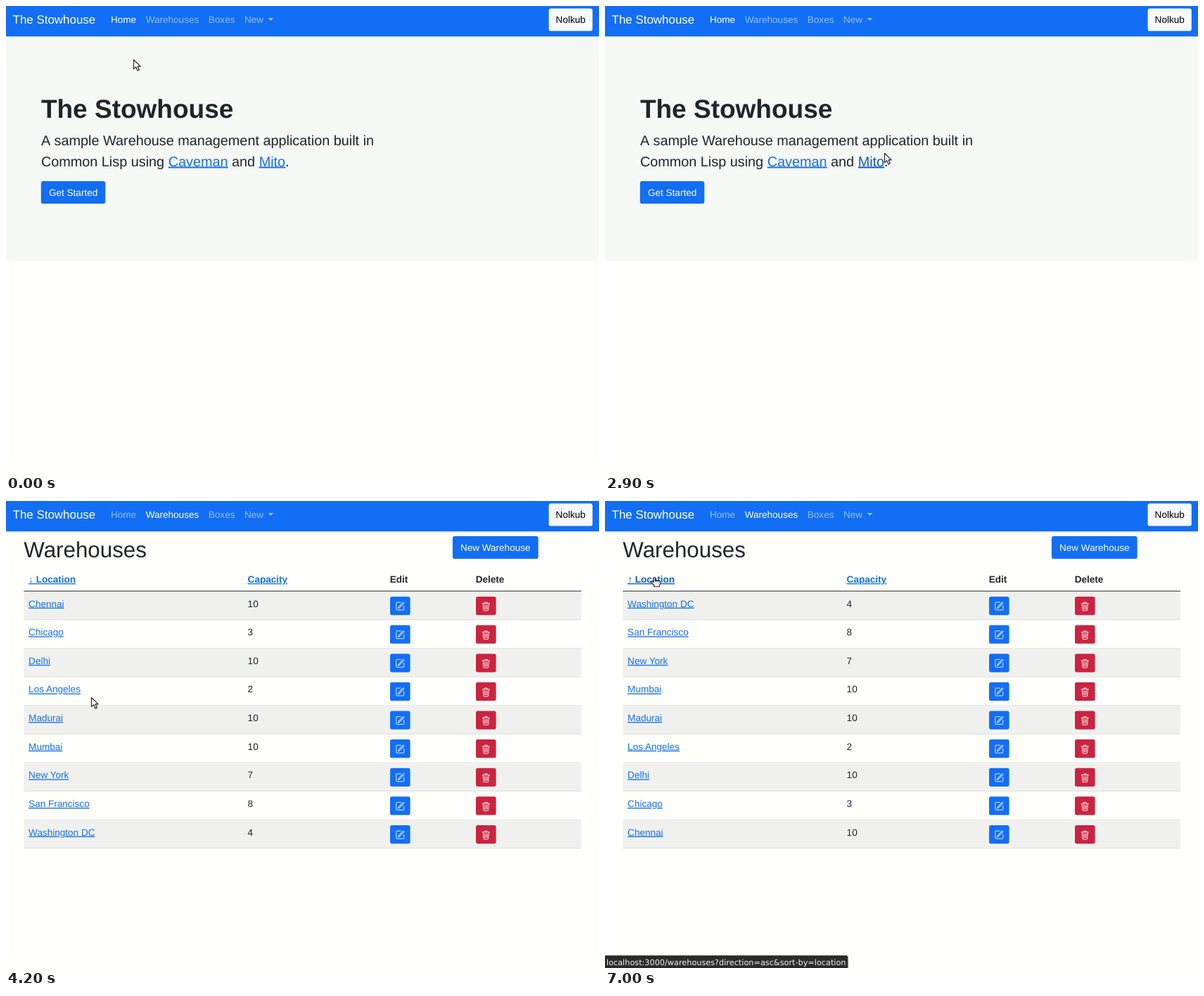
An HTML page for the animation above (8000 ms loop, 843 by 664 pixels).

```html
<!DOCTYPE html>
<html lang="en">
<head>
<meta charset="utf-8">
<title>The Stowhouse</title>
<style>
html, body { margin: 0; width: 100%; height: 100%; overflow: hidden; background: #fffffb; }
svg { display: block; }
text { font: 13.55px "Liberation Sans", Arial, sans-serif; fill: #212529; white-space: pre; text-rendering: geometricPrecision; }
.b { font-weight: bold; }
.w { fill: #fff; }
.link { fill: #146ef0; text-decoration: underline; }
.link.on { fill: #0f58c6; }
.lead { font-size: 19.83px; }
#tip text { font: 11.28px "DejaVu Sans", Verdana, sans-serif; fill: #f4f4f0; }
.icon { fill: none; stroke: #fff; stroke-linecap: round; stroke-linejoin: round; }
#cursor path { stroke-linejoin: round; }
</style>
</head>
<body>
<svg id="stage" width="843" height="664" viewBox="0 0 843 664"></svg>
<script>
const BLUE = '#126ef4', LOOP = 8000, STEP = 100, ROW = 40.63, TOP = 128.6;
const $ = id => document.getElementById(id);

const text = (x, y, s, attrs = '') => `<text x="${x}" y="${y}" ${attrs}>${s}</text>`;
const box = (x, y, w, h, fill, attrs = '') =>
  `<rect x="${x}" y="${y}" width="${w}" height="${h}" fill="${fill}" ${attrs}/>`;

const cities = [['Chennai', 10], ['Chicago', 3], ['Delhi', 10], ['Los Angeles', 2], ['Madurai', 10],
  ['Mumbai', 10], ['New York', 7], ['San Francisco', 8], ['Washington DC', 4]];

const nav = box(0, 0, 843, 43.3, BLUE) +
  text(9.6, 25.4, 'The Stowhouse', 'class="w" style="font-size:16.93px"') +
  text(149, 24.3, 'Home', 'class="w" id="navHome"') +
  text(198.7, 24.3, 'Warehouses', 'class="w" id="navList"') +
  text(287.8, 24.3, 'Boxes', 'class="w" opacity=".55"') +
  text(339, 24.3, 'New', 'class="w" opacity=".55"') +
  '<path d="M372.6 17h7.8l-3.9 3.9z" fill="#fff" opacity=".55"/>' +
  box(771.6, 3.4, 62.2, 32.2, '#f8f9fa', 'rx="3.2"') +
  text(802.7, 24.3, 'Nolkub', 'text-anchor="middle" style="fill:#000"');

const home = box(0, 43, 843, 319.3, '#f6f8f6') +
  text(49.9, 159.3, 'The Stowhouse', 'class="b" style="font-size:37px"') +
  text(49.9, 197.6, 'A', 'class="lead"') +
  text(68.6, 197.6, 'sample Warehouse management application built in', 'class="lead"') +
  text(49.9, 227.5, 'Common Lisp using <tspan class="link" id="caveman">Caveman</tspan> and ' +
    '<tspan class="link" id="mito">Mito</tspan>.', 'class="lead"') +
  box(48.1, 247.2, 94.9, 35.6, 'none', 'rx="4.6" stroke="#8cb9fb" stroke-width="3.4" id="ring"') +
  box(49.8, 248.9, 91.5, 32.2, BLUE, 'rx="3.2" id="start"') +
  text(95.6, 269.5, 'Get Started', 'class="w" text-anchor="middle"');

const PEN = '<path d="M9 1.5H2.5a1 1 0 0 0-1 1v11a1 1 0 0 0 1 1h11a1 1 0 0 0 1-1v-6"/>' +
  '<path d="M12.4 2.2l1.6 1.6-7.3 7.2-2.2.8.8-2.2zM13.6 1l1.5 1.5" fill="#fff" fill-opacity=".35"/>';
const BIN = '<path d="M2 3.5h12M5.7 3.2V1.5h4.6v1.7M3.2 4l.8 10.5a1 1 0 0 0 1 1h6a1 1 0 0 0 1-1L12.8 4' +
  'M5.6 6l.3 7M8 6v7M10.4 6l-.3 7"/>';
const iconButton = (x, y, fill, icon) => box(x, y, 28.6, 26.3, fill, 'rx="2.7"') +
  `<g class="icon" transform="translate(${x + 7.5} ${y + 6.9}) scale(.8464)">${icon}</g>`;

const row = (_, i) => {
  const y = TOP + i * ROW;
  return (i % 2 ? '' : box(25.4, y, 792.6, ROW, '#f0f1ee')) +
    box(25.4, y + ROW - .9, 792.6, .9, '#dcdfe1') +
    text(32.1, y + 22, '', `class="link" id="city${i}"`) +
    text(343.6, y + 22, '', `id="cap${i}"`) +
    iconButton(546, y + 7.3, BLUE, PEN) + iconButton(668, y + 7.3, '#cb2340', BIN);
};

const list = text(25.3, 79.6, 'Warehouses', 'style="font-size:31.3px"') +
  box(634.9, 50, 121.8, 32.2, BLUE, 'rx="3.2"') +
  text(695.7, 71, 'New Warehouse', 'class="w" text-anchor="middle"') +
  text(32.1, 116, '', 'class="b link" id="sort"') +
  text(343.6, 116, 'Capacity', 'class="b link"') +
  text(545.7, 116, 'Edit', 'class="b"') + text(667.7, 116, 'Delete', 'class="b"') +
  cities.map(row).join('') + box(25.4, 127.6, 792.6, 1, '#212529');

const BEAM = 'M-2.4-6h1.6L0-5.4.8-6h1.6M-2.4 6h1.6L0 5.4.8 6h1.6M0-5.4V5.4M-1.2 1h2.4';
const cursors = {
  arrow: '<path d="M.5 .5V13.6l3.2-2.9 2.4 5.3 2.3-1-2.4-5.1h4.1z" fill="#fff" stroke="#1a1a1a" stroke-width="1.1"/>',
  beam: `<path d="${BEAM}" fill="none" stroke="#1a1a1a" stroke-width="2.6"/>` +
    `<path d="${BEAM}" fill="none" stroke="#d0d0d0" stroke-width=".8"/>`,
  hand: '<path d="M-1 6V.6a1.1 1.1 0 0 1 2.3 0V4.4H6.6A2 2 0 0 1 8.6 6.4V9L7.4 10.4V12.8H-.2V11L-4 7.2A1.1 1.1 0 0 1-2.4 5.5L-1 6.6z" fill="#fff" stroke="#1a1a1a" stroke-width="1.1"/>' +
    '<path d="M1.6 5v2.4M4 5v2.4M6.2 5.2v2.2" stroke="#1a1a1a" stroke-width=".8" stroke-dasharray="1 .8"/>'
};

$('stage').innerHTML = box(0, 0, 843, 664, '#fffffb') +
  `<g id="home">${home}</g><g id="list">${list}</g>${nav}` +
  '<g id="tip"><path id="tipBox" fill="#2b2b2b" stroke="#4a4a48"/>' + text(2, 659.7, '', 'id="tipText"') + '</g>' +
  '<g id="cursor">' + Object.keys(cursors).map(k => `<g id="${k}">${cursors[k]}</g>`).join('') + '</g>';

// pointer path: time, x, y
const path = [
  [0, 181, 76], [600, 181, 76], [800, 143, 130], [1000, 329, 160], [1100, 225, 207], [1200, 225, 207],
  [1300, 191, 157.5], [1400, 165, 151], [1500, 149, 165], [1800, 185, 232], [2000, 235, 228],
  [2200, 300, 224], [2300, 375, 241], [2400, 375, 241], [2600, 402, 238], [2800, 404, 214],
  [2900, 397, 209], [3100, 372, 222], [3300, 150, 272], [3400, 136, 274], [3800, 121, 279],
  [4500, 121, 279], [4800, 131, 184], [4900, 131, 184], [5300, 103, 127], [5400, 103, 127],
  [5500, 95, 118], [5600, 95, 118], [6000, 426, 150], [6200, 330, 118], [6500, 85, 116],
  [6800, 70, 109], [LOOP, 70, 109]
];
const shapes = [[0, 'arrow'], [800, 'beam'], [1000, 'arrow'], [1100, 'beam'], [1800, 'arrow'], [1900, 'beam'],
  [2000, 'hand'], [2300, 'arrow'], [3000, 'hand'], [3200, 'arrow'], [3400, 'hand'], [4100, 'arrow'],
  [5300, 'hand'], [5700, 'arrow'], [6500, 'hand']];
const hovers = [[0, ''], [2000, 'caveman'], [2300, ''], [2900, 'mito'], [3200, ''], [3400, 'start'],
  [4100, ''], [5500, 'sort'], [5700, ''], [6500, 'sort']];
const repo = 'https://github.com/dovemarki/', local = 'localhost:3000/warehouses';
const tips = [[0, ''], [2200, repo + 'caveman'], [2500, ''], [3100, repo + 'mito'], [3300, ''],
  [3500, local], [4200, ''], [6700, local + '?direction=desc&sort-by=location'],
  [7000, local + '?direction=asc&sort-by=location']];

const at = (keys, t) => keys.filter(k => k[0] <= t).pop()[1];
const show = (id, on) => $(id).setAttribute('display', on ? 'inline' : 'none');

function place(t) {
  const i = Math.max(1, path.findIndex(k => k[0] >= t));
  const [t0, x0, y0] = path[i - 1], [t1, x1, y1] = path[i];
  const p = (t - t0) / (t1 - t0);
  return [x0 + (x1 - x0) * p, y0 + (y1 - y0) * p];
}

function draw(t) {
  const listed = t >= 4100, flipped = t >= 7000;
  show('home', !listed);
  show('list', listed);
  $('navHome').setAttribute('opacity', listed ? .55 : 1);
  $('navList').setAttribute('opacity', listed ? 1 : .55);

  const over = at(hovers, t);
  for (const id of ['caveman', 'mito', 'sort']) $(id).classList.toggle('on', over === id);
  $('start').setAttribute('fill', over === 'start' ? '#0f5dd2' : BLUE);
  show('ring', t >= 3600);

  $('sort').textContent = (flipped ? '↑' : '↓') + ' Location';
  cities.forEach((_, i) => {
    const [name, cap] = cities[flipped ? cities.length - 1 - i : i];
    $('city' + i).textContent = name;
    $('cap' + i).textContent = cap;
  });

  const tip = at(tips, t);
  show('tip', tip);
  if (tip) {
    $('tipText').textContent = tip;
    const w = $('tipText').getComputedTextLength() + 4.6;
    $('tipBox').setAttribute('d', `M-1 646.5H${w - 2}q2 0 2 2V665H-1z`);
  }

  const shape = at(shapes, t), [x, y] = place(t);
  for (const k in cursors) show(k, k === shape);
  $('cursor').setAttribute('transform', `translate(${x} ${y})`);
}

let last = -1;
const begin = performance.now();
function tick() {
  const t = Math.floor(((performance.now() - begin) % LOOP) / STEP) * STEP;
  if (t !== last) draw(last = t);
  requestAnimationFrame(tick);
}
tick();
</script>
</body>
</html>
```
